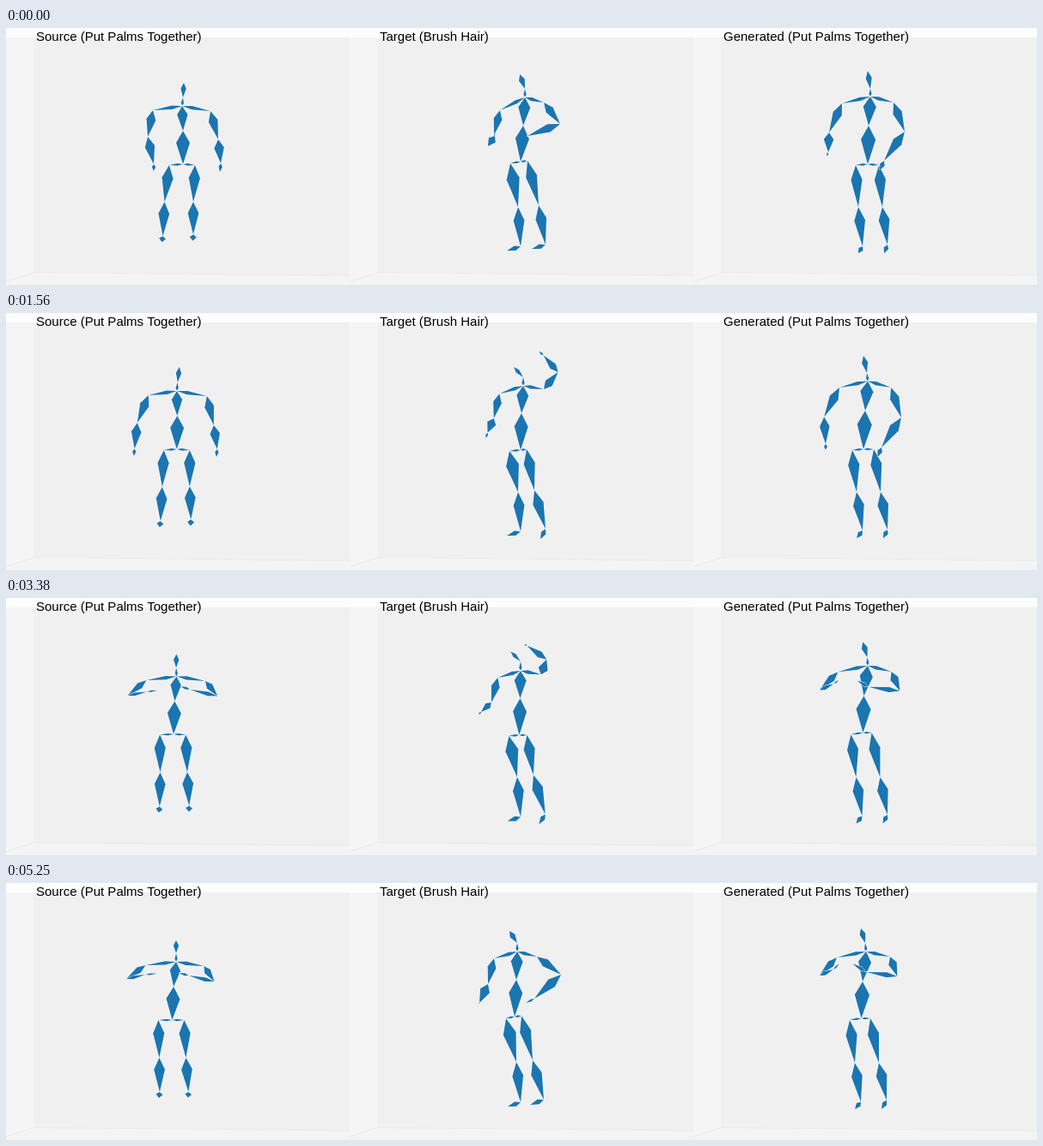
An HTML page with a canvas for the animation above (5310 ms loop, 1200x300 px).

```html
<!DOCTYPE html>
<html lang="en">
<head>
<meta charset="utf-8">
<title>Skeleton motion transfer</title>
<style>
  html, body { margin: 0; width: 100%; height: 100%; overflow: hidden; background: #f5f5f5; }
  canvas { display: block; }
</style>
</head>
<body>
<canvas id="stage" width="1200" height="300"></canvas>
<script>
const ctx = document.getElementById('stage').getContext('2d');
const LOOP = 5310;

// joint: [parent, half width of the bone, widest point along it]
const RIG = {
  chest: [null],
  neck: ['chest', 1.6, .35], head: ['neck', 3.6, .6],
  spine: ['chest', 7, .35], pelvis: ['spine', 8, .36],
};
for (const s of 'LR') Object.assign(RIG, {
  ['hip' + s]: ['pelvis', 1.3, .4], ['knee' + s]: ['hip' + s, 6.6, .35],
  ['ankle' + s]: ['knee' + s, 6.4, .34], ['toe' + s]: ['ankle' + s, 3, .4],
  ['shoulder' + s]: ['chest', 2.2, .35], ['elbow' + s]: ['shoulder' + s, 5.5, .35],
  ['wrist' + s]: ['elbow' + s, 5.8, .35], ['tip' + s]: ['wrist' + s, 2.2, .4],
});

// Joints left out of a pose carry over from the one before, moved by shift.
function figure(...poses) {
  let last = {};
  return poses.map(({ at, shift = [0, 0], ...moved }) => {
    const joints = {};
    for (const name in RIG) {
      const [px, py, pw = RIG[name][1] || 0] = last[name] || [];
      const [x = px + shift[0], y = py + shift[1], w = pw] = moved[name] || [];
      joints[name] = [x, y, w];
    }
    last = joints;
    return { at, joints };
  });
}

const first = figure(
  { at: 0, head: [207, 64, 3.2], neck: [206, 81], chest: [205, 91], spine: [206, 120, 6.2], pelvis: [206, 159],
    hipL: [190, 160], kneeL: [184.5, 203], ankleL: [182.5, 243], toeL: [181.5, 250, 4],
    hipR: [220, 160], kneeR: [218, 203], ankleR: [218, 241], toeR: [217.5, 248.5, 4],
    shoulderL: [171, 96], elbowL: [165, 127], wristL: [172, 159], tipL: [172, 167],
    shoulderR: [238, 97], elbowR: [247, 130], wristR: [250, 158], tipR: [249, 168] },
  { at: 15, shift: [-1.5, 0], head: [203, 63], neck: [201, 81], chest: [200, 91], spine: [200.5, 120],
    pelvis: [200, 159], hipL: [185, 160], hipR: [215, 160], kneeR: [215, 202.5],
    shoulderL: [167, 96], elbowL: [156, 129], wristL: [152, 160], tipL: [152, 169],
    shoulderR: [235, 97], elbowR: [243, 131], wristR: [247, 159], tipR: [246, 168] },
  { at: 25, shift: [-1.5, 0], elbowL: [152, 128], wristL: [149, 158], tipL: [148, 166] },
  { at: 32, shift: [-.7, 0], head: [200, 63], neck: [199, 81], chest: [199, 91], spine: [198, 120],
    pelvis: [197, 158], hipL: [182, 159], hipR: [212, 159],
    shoulderL: [163, 96], elbowL: [151, 121, 5.5], wristL: [167, 128, 2.5], tipL: [175, 124, 1],
    shoulderR: [232, 97], elbowR: [245, 122], wristR: [228, 131, 2.5], tipR: [217, 128, 1.2] },
  { at: 43, shift: [-.8, 0], head: [198.5, 65], chest: [199, 91], hipL: [180.5, 159], hipR: [210.5, 159],
    shoulderL: [164, 96], elbowL: [142, 114, 3.8], wristL: [165, 110, 2], tipL: [176, 108, 1],
    shoulderR: [233, 97], elbowR: [249, 114, 4], wristR: [215, 105, 2.4], tipR: [204, 101, 1.5] },
  { at: 58, shift: [-1.5, 1], head: [198, 66], neck: [198, 82], chest: [198, 92], pelvis: [194, 160],
    hipL: [178, 160], hipR: [208, 160], kneeL: [179, 204], kneeR: [210, 204],
    ankleL: [179.5, 244], toeL: [178.5, 251], ankleR: [213, 244], toeR: [212.5, 250.5],
    shoulderL: [163, 96], elbowL: [141, 114], wristL: [163, 109], tipL: [177, 107.5],
    shoulderR: [231, 97], elbowR: [244, 115], wristR: [213, 108], tipR: [202, 105] },
  { at: 69, shift: [-.6, 0], head: [198, 67], neck: [198, 82], chest: [198, 92] },
  { at: 79, elbowL: [140, 112], wristL: [162, 107], tipL: [176, 105.5], elbowR: [242.5, 115] }
);

const second = figure(
  { at: 0, head: [598, 54], neck: [604, 71], chest: [604, 81], spine: [602, 114], pelvis: [599, 156],
    hipL: [587, 158], kneeL: [596, 209, 7.6], ankleL: [599, 255], toeL: [583, 260],
    hipR: [607, 155], kneeR: [620, 207], ankleR: [628, 253], toeR: [612, 258],
    shoulderL: [575, 96], elbowL: [568, 125, 5], wristL: [569, 126, 2], tipL: [561, 138, 4.8],
    shoulderR: [626, 87], elbowR: [645, 112, 5], wristR: [607, 126, 5], tipR: [606, 126, .3] },
  { at: 15, head: [591, 63, 2.4], neck: [602, 75], chest: [602, 85], spine: [600, 117], pelvis: [599, 160],
    hipL: [586, 161], hipR: [606, 159], kneeR: [615, 207], ankleR: [628, 252], toeR: [622, 264],
    shoulderL: [575, 95], elbowL: [567, 125], wristL: [566, 151, 6.5], tipL: [573, 157, 1.5],
    shoulderR: [623, 91], elbowR: [637, 70], wristR: [629, 48], tipR: [629, 45, 2] },
  { at: 18, elbowR: [641, 66], wristR: [632, 39], tipR: [630, 34] },
  { at: 25, shoulderL: [574, 94], elbowL: [568, 122], wristL: [560, 135, 5], tipL: [556, 139],
    shoulderR: [627, 88], elbowR: [643, 70], wristR: [624, 54, 4], tipR: [617, 50, 1] },
  { at: 32, head: [587, 65], neck: [601, 74], chest: [601, 85], hipL: [587, 161], hipR: [608, 160],
    shoulderL: [574, 93], elbowL: [568, 121], wristL: [557, 129, 3.8], tipL: [553, 132, 1],
    shoulderR: [627, 87], elbowR: [644, 69], wristR: [623, 53], tipR: [615, 49.5] },
  { at: 43, head: [590, 63], toeR: [618, 264], elbowL: [567, 122], wristL: [555.5, 132], tipL: [552, 136],
    shoulderR: [627, 88], elbowR: [637, 73], wristR: [613, 55.5], tipR: [610, 54] },
  { at: 58, shift: [-3, 0], head: [585, 62], neck: [597, 74], chest: [597, 85],
    kneeL: [594, 209], ankleL: [599, 256], toeL: [584, 261], kneeR: [613, 206], ankleR: [627.5, 253], toeR: [622, 264],
    shoulderL: [571, 93], elbowL: [563, 122], wristL: [551, 134], tipL: [548, 136],
    shoulderR: [619, 90], elbowR: [622, 71, 6.5], wristR: [600, 56], tipR: [597, 54.5] },
  { at: 69, shift: [-2, 0], pelvis: [593, 160], head: [583, 61.5], neck: [596, 74], chest: [595.5, 85],
    hipR: [602, 159], kneeR: [610, 207], ankleL: [598, 255], ankleR: [627, 253], toeR: [621, 264],
    elbowL: [562, 122], wristL: [551, 133], tipL: [548, 136],
    shoulderR: [616, 90], elbowR: [627, 77, 5], wristR: [609, 67, 3], tipR: [599, 62, 1.8] },
  { at: 79, head: [586, 56, 3.4], neck: [595, 70], chest: [595, 80], spine: [594, 113], pelvis: [592, 156],
    hipL: [582, 158], kneeL: [594, 209], ankleL: [599, 256], toeL: [584, 261],
    hipR: [600, 155], kneeR: [613, 207], ankleR: [626, 253], toeR: [610, 259],
    shoulderL: [568, 88], elbowL: [561, 118], wristL: [551, 140, 6], tipL: [550, 141, .5],
    shoulderR: [618, 86], elbowR: [646, 107], wristR: [615, 135, 5.8], tipR: [605, 140, 1.3] }
);

const third = figure(
  { at: 0, head: [1003, 50], neck: [1006, 71], chest: [1006, 80], spine: [1004, 114, 7.6], pelvis: [1003, 159, 8.6],
    hipL: [989, 160], kneeL: [992, 209], ankleL: [997, 255], toeL: [992, 263],
    hipR: [1016, 160], kneeR: [1020, 209], ankleR: [1026, 253], toeR: [1022, 263],
    shoulderL: [973, 88], elbowL: [958, 122], wristL: [957, 145], tipL: [955, 150, 1],
    shoulderR: [1033, 87], elbowR: [1046, 121], wristR: [1022, 155], tipR: [1017, 166, 3] },
  { at: 15, shift: [-2, 0], head: [998, 50], neck: [1002, 70], chest: [1003, 79.5], spine: [1000, 114],
    pelvis: [998, 159], hipL: [985, 160], hipR: [1010, 159], ankleL: [997, 254], ankleR: [1026, 253], toeR: [1021, 263],
    shoulderL: [970, 87], elbowL: [953, 122], wristL: [954, 153], tipL: [954, 160, 2],
    shoulderR: [1030, 87], elbowR: [1042, 122], wristR: [1019, 157], tipR: [1014.5, 168] },
  { at: 25, elbowL: [952, 121] },
  { at: 32, head: [997, 51], spine: [999, 114], pelvis: [998, 158], hipL: [984, 160], hipR: [1008, 157],
    shoulderL: [968, 87], elbowL: [951, 115], wristL: [955, 118, 1.5], tipL: [943, 119, 4],
    shoulderR: [1031, 87], elbowR: [1050, 113], wristR: [1008, 122, 4.6], tipR: [985, 124, 2] },
  { at: 43, head: [998, 51], neck: [1003, 69], chest: [1004, 79], pelvis: [998, 157], hipL: [984, 159],
    shoulderL: [969, 86], elbowL: [948, 107, 4.2], wristL: [965, 99, 2.5], tipL: [970, 96, 1],
    shoulderR: [1031, 86], elbowR: [1042, 107, 5], wristR: [1006, 103, 3], tipR: [994, 95, 2] },
  { at: 58, shift: [-1, .5], head: [996.5, 51.5], chest: [1002, 79], ankleL: [996, 255], ankleR: [1026, 253],
    elbowL: [946, 108], wristL: [962, 101], tipL: [969, 96],
    shoulderR: [1030, 86], elbowR: [1039, 110], wristR: [1002, 104.5], tipR: [988, 98] },
  { at: 69, shift: [-1, .5], head: [995, 53], neck: [1000, 70], chest: [1001, 80], pelvis: [995.5, 158],
    shoulderL: [967, 87], elbowL: [947, 108], wristL: [963, 101], tipL: [969, 95],
    shoulderR: [1029, 86], elbowR: [1037, 112], wristR: [1000, 104.5], tipR: [986, 98] },
  { at: 79, tipL: [970, 94], elbowR: [1037.5, 109], wristR: [1002, 104], tipR: [985, 94] }
);

const mix = (a, b, t) => a + (b - a) * t;

// Each joint turns about its parent while its distance changes.
function poseAt(poses, n) {
  const i = Math.max(1, poses.findIndex(p => p.at >= n));
  const { at: start, joints: A } = poses[i - 1], { at: end, joints: B } = poses[i];
  const t = (n - start) / (end - start), out = {};
  for (const name in RIG) {
    const a = A[name], b = B[name], parent = RIG[name][0];
    const w = mix(a[2], b[2], t);
    if (!parent) { out[name] = [mix(a[0], b[0], t), mix(a[1], b[1], t), w]; continue; }
    const [ax, ay] = A[parent], [bx, by] = B[parent], [x, y] = out[parent];
    const from = Math.atan2(a[1] - ay, a[0] - ax);
    const turn = Math.atan2(b[1] - by, b[0] - bx) - from;
    const angle = from + Math.atan2(Math.sin(turn), Math.cos(turn)) * t;
    const len = mix(Math.hypot(a[0] - ax, a[1] - ay), Math.hypot(b[0] - bx, b[1] - by), t);
    out[name] = [x + len * Math.cos(angle), y + len * Math.sin(angle), w];
  }
  return out;
}

function polygon(color, points, edge) {
  ctx.beginPath();
  for (const [x, y] of points) ctx.lineTo(x, y);
  ctx.closePath();
  if (edge) {
    ctx.strokeStyle = edge;
    ctx.stroke();
  }
  ctx.fillStyle = color;
  ctx.fill();
}

function drawFigure(joints) {
  ctx.lineWidth = 1;
  for (const name in RIG) {
    const [parent, , along] = RIG[name];
    if (!parent) continue;
    const [x0, y0] = joints[parent], [x1, y1, w] = joints[name];
    const dx = x1 - x0, dy = y1 - y0, len = Math.hypot(dx, dy) || 1;
    const mx = x0 + dx * along, my = y0 + dy * along;
    const nx = -dy / len * w, ny = dx / len * w;
    polygon('#1b75b1', [[x0, y0], [mx + nx, my + ny], [x1, y1], [mx - nx, my - ny]], '#fff');
  }
}

function drawPanel(x, title) {
  const left = x + 32.5, right = x + 400;
  polygon('#fdfdfd', [[x, 0], [right, 0], [right, 11], [x, 11]]);
  polygon('#f5f5f5', [[x, 11], [left, 11], [left, 285], [x, 296]]);
  polygon('#f0f0f0', [[left, 11], [right, 11], [right, 289], [left, 285]]);
  polygon('#f4f4f4', [[x, 296], [left, 285], [right, 289], [right, 300], [x, 300]]);
  ctx.strokeStyle = '#ebebeb';
  ctx.lineWidth = 1;
  ctx.beginPath();
  ctx.moveTo(x, 296);
  ctx.lineTo(left, 285.5);
  ctx.lineTo(right, 289);
  ctx.stroke();
  ctx.fillStyle = '#000';
  ctx.font = '15px "Liberation Sans", Arial, sans-serif';
  ctx.fillText(title, x + 35, 15);
}

function draw() {
  // 16 pictures a second, showing poses sampled at 15 a second
  const tick = Math.floor(performance.now() % LOOP / 10);
  const step = Math.ceil((tick + .5) / 6.25) - 1;
  const n = Math.max(0, Math.ceil(step * 15 / 16 - .5));
  drawPanel(0, 'Source (Put Palms Together)');
  drawPanel(400, 'Target (Brush Hair)');
  drawPanel(800, 'Generated (Put Palms Together)');
  for (const poses of [first, second, third]) drawFigure(poseAt(poses, n));
  requestAnimationFrame(draw);
}
draw();
</script>
</body>
</html>
```
